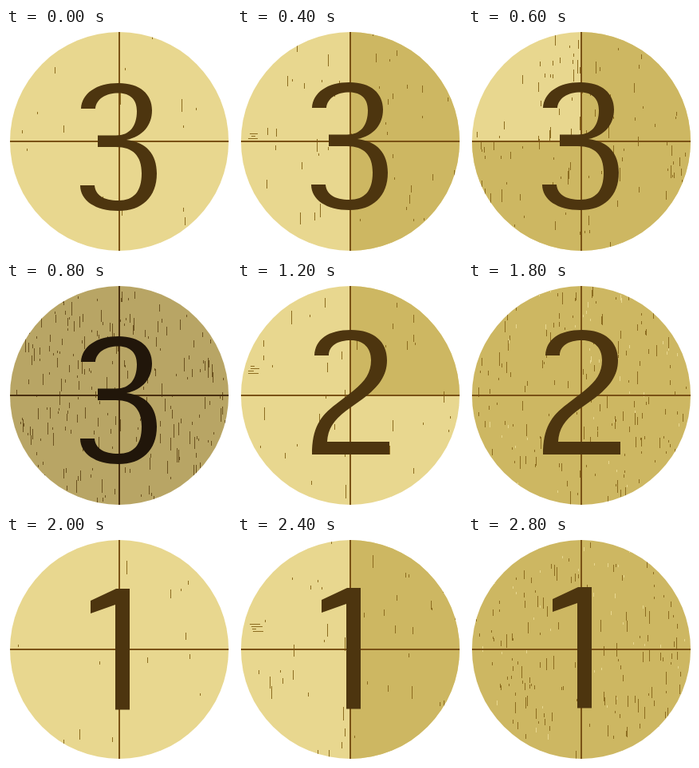
Recreate the animation shown at these times as an HTML page with a canvas. Size 282 by 283 pixels, loop 3 s.

```html
<!DOCTYPE html>
<html lang="en">
<head>
<meta charset="utf-8">
<title>Film countdown</title>
<style>
  html, body { margin: 0; width: 100%; height: 100%; overflow: hidden; background: #fff; }
  canvas { display: block; width: 100vw; height: 100vh; }
</style>
</head>
<body>
<canvas id="stage" width="282" height="283"></canvas>
<script>
const ctx = document.getElementById('stage').getContext('2d');
const CX = 142, CY = 142, R = 137;
const STEP_MS = 200, STEPS_PER_DIGIT = 5, STEP_COUNT = 15;
const FLASH_STEP = 4;

const NORMAL = { light: '#e8d78f', dark: '#cdb762', ink: '#4d350f', line: '#7a5216', scratch: '#8c6c20' };
const FLASH = { light: '#b8a565', dark: '#b8a565', ink: '#21160a', line: '#4a3010', scratch: '#6b5220' };

// Outlines of 3, 2 and 1: heavy sides, lighter tops and bars
const DIGITS = [
  'M94 101C95 82 113 69 141 69C168 69 183 83 183 103C183 122 171 136 151 140' +
  'C176 143 189 158 189 182C189 212 170 229 141 229C112 229 93 216 93 197H111' +
  'C112 209 122 216 141 216C160 216 170 205 170 182C170 160 159 149 138 149H115V134.5H138' +
  'C155 134.5 164 123 164 104C164 90 156 81.5 141 81.5C125 81.5 113 89 112 101Z',
  'M97 92C98 72 114 60 143 60C172 60 188 75 188 98C188 117 178 131 158 146' +
  'L137 161C121 173 114 184 113 200H191V216H94C94 183 104 168 124 153' +
  'L146 136C161 124 168 113 168 98C168 83 159 73 143 73C126 73 115 80 115 92Z',
  'M155 66V217.5H137V86L106 97V81L138 66Z'
].map(outline => new Path2D(outline));

// Gate weave of the digit in each step: [x, y]
const WEAVE = [
  [0, 0], [0, 0], [0, -1], [0, -1], [0, -1],
  [0, 0], [0, 0], [0, 0], [-1, 1], [0, 0],
  [0, 0], [0, 0], [0, -1], [0, -1], [0, -2]
];
const SCRATCHES = [20, 48, 58, 120, 170];

function seededRandom(seed) {
  let a = seed * 7919 + 17;
  return () => {
    a = (a + 0x6D2B79F5) | 0;
    let t = Math.imul(a ^ (a >>> 15), 1 | a);
    t = (t + Math.imul(t ^ (t >>> 7), 61 | t)) ^ t;
    return ((t ^ (t >>> 14)) >>> 0) / 4294967296;
  };
}

function scratches(random, count, maxLength, color) {
  ctx.fillStyle = color;
  for (let i = 0; i < count; i++) {
    const x = Math.floor(5 + random() * 272);
    const y = Math.floor(5 + random() * 268);
    ctx.fillRect(x, y, 1, Math.ceil(2 + random() ** 2 * maxLength));
  }
}

function hairlines(random, color) {
  const top = 100 + Math.floor(random() * 35);
  ctx.fillStyle = color;
  for (let i = 0; i < 4; i++) {
    ctx.fillRect(14 + Math.floor(random() * 8), top + i * 3, 5 + Math.floor(random() * 10), 1);
  }
}

function draw(step) {
  const phase = step % STEPS_PER_DIGIT;
  const flash = step === FLASH_STEP;
  const colors = flash ? FLASH : NORMAL;
  const random = seededRandom(step + 1);

  ctx.fillStyle = '#fff';
  ctx.fillRect(0, 0, 282, 283);
  ctx.save();
  ctx.beginPath();
  ctx.arc(CX, CY, R, 0, Math.PI * 2);
  ctx.fillStyle = phase === 4 ? colors.dark : colors.light;
  ctx.fill();
  ctx.clip();

  // The shutter sweeps one quarter turn per step.
  if (phase > 0 && phase < 4) {
    ctx.beginPath();
    ctx.moveTo(CX, CY);
    ctx.arc(CX, CY, R + 1, -Math.PI / 2, (phase - 1) * Math.PI / 2);
    ctx.closePath();
    ctx.fillStyle = colors.dark;
    ctx.fill();
  }

  scratches(random, flash ? 270 : SCRATCHES[phase], 15, colors.scratch);
  if (phase === 1 || phase === 2) hairlines(random, colors.scratch);
  if (phase === 4 && !flash) scratches(random, 50, 5, colors.light);

  ctx.fillStyle = colors.line;
  ctx.fillRect(5, 141, 274, 2);
  ctx.fillRect(141, 5, 2, 274);

  ctx.translate(...WEAVE[step]);
  ctx.fillStyle = colors.ink;
  ctx.fill(DIGITS[Math.floor(step / STEPS_PER_DIGIT)]);
  ctx.restore();
}

let start = null;
let shown = -1;
function tick(now) {
  if (start === null) start = now;
  const step = Math.floor((now - start) / STEP_MS) % STEP_COUNT;
  if (step !== shown) draw(shown = step);
  requestAnimationFrame(tick);
}
draw(shown = 0);
requestAnimationFrame(tick);
</script>
</body>
</html>
```
